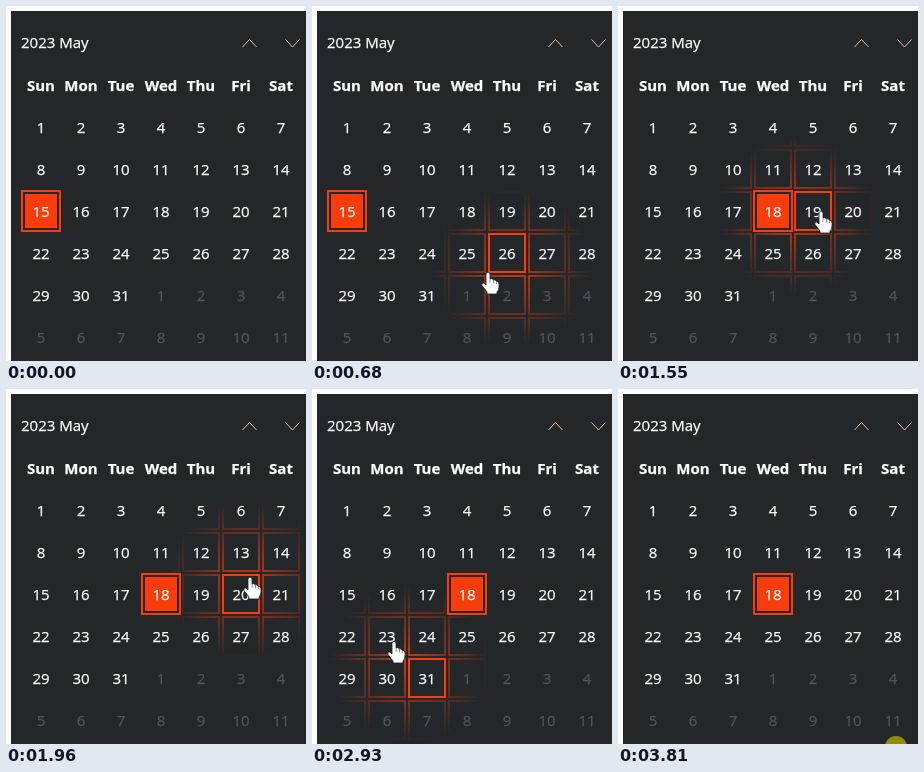
Recreate the animation shown at these times as an HTML page. Size 300 by 355 pixels, loop 3950 ms.

```html
<!DOCTYPE html>
<html lang="en">
<head>
<meta charset="utf-8">
<title>Calendar with reveal highlight</title>
<style>
  html, body { margin: 0; width: 100%; height: 100%; overflow: hidden; background: #fff; }
  svg { display: block; width: 300px; height: 355px; }
  text { font: 15px "Open Sans", "Noto Sans", sans-serif; fill: #fff; stroke: #fff; stroke-width: .25; text-anchor: middle; }
  .title { text-anchor: start; }
  .head { font-weight: 700; }
  .muted { fill: #565553; stroke: #565553; }
  .chevron { fill: none; stroke: #e6bf94; }
  .edge { fill: none; stroke-width: 2; }
  .accent { stroke: #f83c0c; }
</style>
</head>
<body>
<svg viewBox="0 0 300 355">
  <defs>
    <radialGradient id="light" gradientUnits="userSpaceOnUse" r="80">
      <stop offset="0" stop-color="#f83c0c" stop-opacity=".8"/>
      <stop offset="1" stop-color="#f83c0c" stop-opacity="0"/>
    </radialGradient>
  </defs>
  <rect x="5" y="5" width="295" height="350" fill="#23272a"/>
  <path class="chevron" d="M236.5 41 243.5 33.5 250.5 41M279.5 33.5 286.5 41 293.5 33.5"/>
  <path id="glow" class="edge" stroke="url(#light)"/>
  <rect id="hover" class="edge accent" x="2" y="2" width="36" height="38"/>
  <g id="picked">
    <rect width="40" height="42" fill="#23272a"/>
    <rect class="edge accent" x="1" y="1" width="38" height="40"/>
    <rect x="4" y="4" width="32" height="34" fill="#f83c0c"/>
  </g>
  <g id="labels"><text class="title" x="15" y="42" textLength="auto">2023 May</text></g>
  <g id="hand">
    <path fill="#fff" stroke="#1b1e20" stroke-width=".8"
      d="M-2 1.5Q0-1.5 2 1.5V7Q4 5.5 5.5 8Q7.5 7 8.5 9.5Q11 9 11 12V15Q11 18 9 20V22H-1V20L-6 13.5Q-7 10.5-4 11L-2 13Z"/>
    <path fill="none" stroke="#555" stroke-width=".6" d="M2 7V11M5.5 8V11.5M8.5 9.5V12"/>
  </g>
  <circle id="spot" cx="278" cy="358" r="11" fill="#8f8f08"/>
</svg>
<script>
const LOOP = 3950, STEP = 68, PICK = 1280, SPOT = 3810;
const LEFT = 15, TOP = 100, CELL_W = 40, CELL_H = 42, COLS = 7, ROWS = 6;

// The pointer moves in steps, with rests between: start time, first and last step
const moves = [[200, 0, 11], [1280, 12, 18], [1840, 19, 45]];
const GONE = 45;

// Turning points of the pointer: step, x, y
const path = [
  [0, 112, 340], [3, 150, 226], [6, 200, 262], [7, 176, 266], [10, 146, 215],
  [13, 146, 215], [15, 178, 210], [17, 228, 200], [21, 244, 188],
  [23, 210, 230], [28, 120, 175], [29, 130, 167], [31, 218, 185],
  [34, 98, 274], [35, 82, 252], [39, 215, 195], [44, 278, 355]
];

const $ = id => document.getElementById(id);
const show = (el, on) => { el.style.display = on ? '' : 'none'; };
const place = (el, x, y) => el.setAttribute('transform', `translate(${x} ${y})`);
const placeInCell = (el, col, row) => place(el, LEFT + col * CELL_W, TOP + row * CELL_H);

function stepAt(t) {
  const move = moves.filter(m => m[0] <= t).pop();
  if (!move) return -1;
  const [start, first, last] = move;
  return Math.min(last, first + Math.floor((t - start) / STEP + .25));
}

function pointer(step) {
  const i = Math.max(1, path.findIndex(p => p[0] >= step));
  const [s0, x0, y0] = path[i - 1], [s1, x1, y1] = path[i];
  const k = (step - s0) / (s1 - s0);
  return [x0 + (x1 - x0) * k, y0 + (y1 - y0) * k];
}

function addLabel(text, col, y, cls) {
  const el = document.createElementNS('http://www.w3.org/2000/svg', 'text');
  el.textContent = text;
  el.setAttribute('x', LEFT + CELL_W * (col + .5));
  el.setAttribute('y', y);
  el.setAttribute('class', cls);
  $('labels').append(el);
}

function build() {
  $('labels').firstElementChild.removeAttribute('textLength');
  ['Sun', 'Mon', 'Tue', 'Wed', 'Thu', 'Fri', 'Sat']
    .forEach((name, col) => addLabel(name, col, 85, 'head'));
  let edges = '';
  for (let i = 0; i < COLS * ROWS; i++) {
    const col = i % COLS, row = Math.floor(i / COLS);
    addLabel(i % 31 + 1, col, 127 + row * CELL_H, i < 31 ? 'day' : 'muted');
    edges += `M${LEFT + col * CELL_W + 2} ${TOP + row * CELL_H + 2}h36v38h-36z`;
  }
  $('glow').setAttribute('d', edges);
}

function draw(t) {
  const step = stepAt(t);
  const inside = step >= 0 && step < GONE;
  const lit = inside && step > 0;
  show($('hand'), inside);
  show($('glow'), lit);
  show($('hover'), lit);

  if (inside) place($('hand'), ...pointer(step));
  if (lit) {
    // The light trails the pointer by one step
    const [x, y] = pointer(step - 1);
    $('light').setAttribute('cx', x);
    $('light').setAttribute('cy', y);
    placeInCell($('hover'), Math.floor((x - LEFT) / CELL_W), Math.floor((y - TOP) / CELL_H));
  }

  placeInCell($('picked'), t < PICK ? 0 : 3, 2);
  show($('spot'), t >= SPOT);
}

build();
const start = performance.now();
function loop() {
  draw((performance.now() - start) % LOOP);
  requestAnimationFrame(loop);
}
loop();
</script>
</body>
</html>
```
